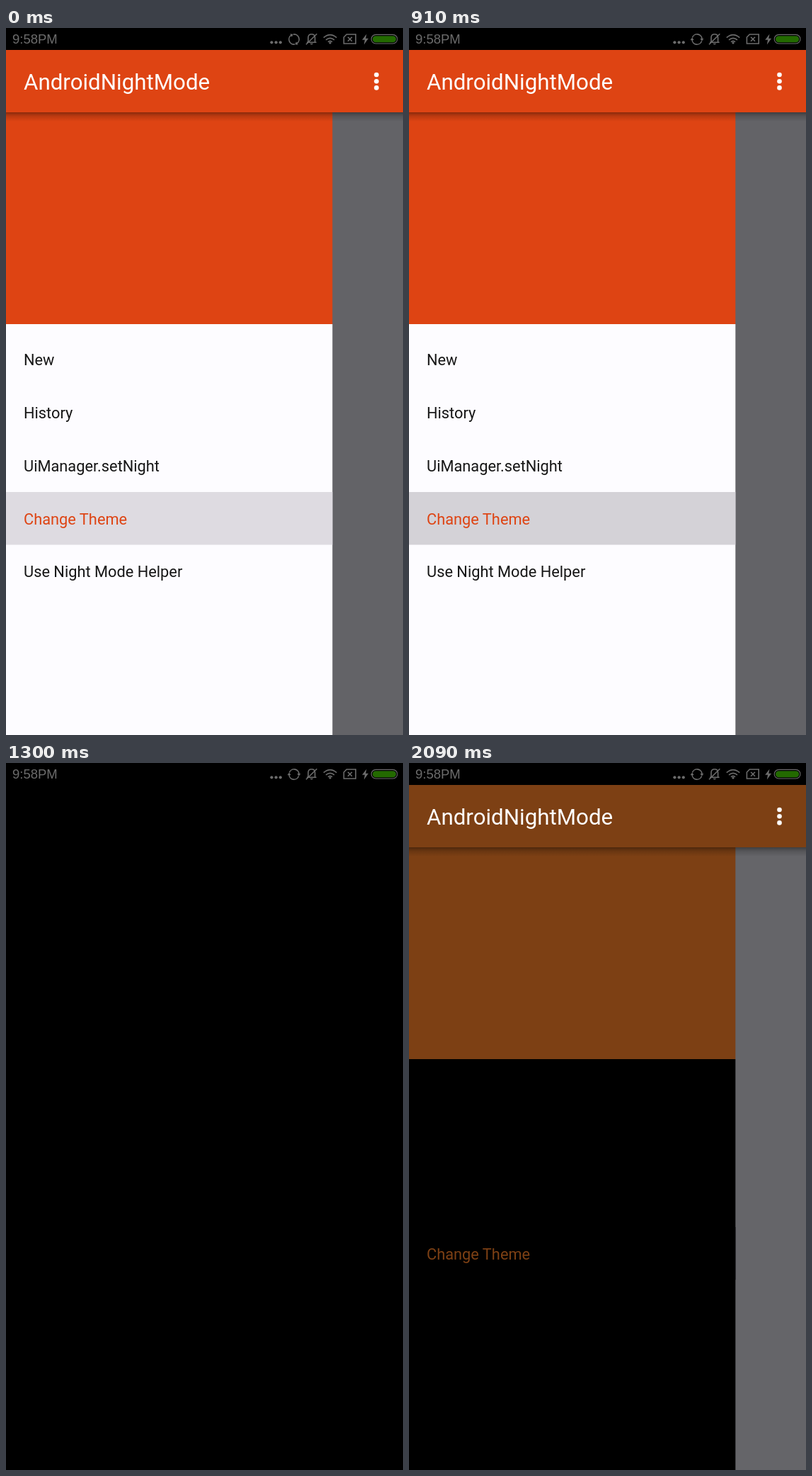
Write an HTML page that moves like this. It is 561 px wide and 998 px high and loops after 2220 ms.

```html
<!DOCTYPE html>
<html lang="en">
<head>
<meta charset="utf-8">
<title>Night mode</title>
<style>
  html, body { margin: 0; width: 100%; height: 100%; overflow: hidden; background: #000; }
  svg { display: block; width: 100vw; height: 100vh; }
  .day { --main: #de4413; --paper: #fdfcff; --ink: #161616; --dim: #636367; }
  .night { --main: #7d4014; --paper: #000; --ink: #000; --dim: #656569; }
  .main { fill: var(--main); }
  .paper { fill: var(--paper); }
  .dim { fill: var(--dim); }
  .title { font: 31.3px Roboto, sans-serif; fill: #fff; }
  .menu { font: 21.8px Roboto, sans-serif; fill: var(--ink); }
  .menu .on { fill: var(--main); }
  .clock { font: 18.5px "Liberation Sans", Arial, sans-serif; }
  .line { fill: none; stroke: #6c6c6c; stroke-width: 1.6; }
</style>
</head>
<body>
<svg viewBox="0 0 561 998" preserveAspectRatio="none">
  <defs>
    <linearGradient id="shade" x2="0" y2="1">
      <stop offset="0" stop-opacity=".38"/>
      <stop offset=".4" stop-opacity=".16"/>
      <stop offset="1" stop-opacity="0"/>
    </linearGradient>
  </defs>
  <rect width="561" height="998"/>

  <g id="app" class="day">
    <rect class="dim" y="119" width="561" height="879"/>
    <g id="drawer">
      <rect class="paper" y="418" width="461.3" height="580"/>
      <rect class="main" y="119" width="461.3" height="299"/>
      <rect id="row" y="655" width="461.3" height="74.5"/>
      <g id="menu" class="menu"></g>
    </g>
    <rect class="main" y="31" width="561" height="88"/>
    <rect y="119" width="561" height="13" fill="url(#shade)"/>
    <text class="title" x="25" y="87">AndroidNightMode</text>
    <g fill="#fff">
      <circle cx="523.5" cy="66" r="3.3"/>
      <circle cx="523.5" cy="75.2" r="3.3"/>
      <circle cx="523.5" cy="84.4" r="3.3"/>
    </g>
  </g>

  <g id="status" fill="#6c6c6c">
    <text class="clock" x="9" y="22.3">9:58PM</text>
    <circle cx="375.4" cy="20.3" r="2.1"/>
    <circle cx="381.6" cy="20.3" r="2.1"/>
    <circle cx="387.8" cy="20.3" r="2.1"/>
    <g id="sync">
      <path class="line" d="M400.4 13.5A7 7 0 0 1 414 15.5M413.6 18.5A7 7 0 0 1 400 16.5"/>
      <path d="M411.4 15h5l-2.5 3.4zM397.6 17h5l-2.5 -3.4z"/>
    </g>
    <path class="line" d="M425 20.3h13.6M427 20v-6.2q0-5 4.8-5t4.8 5V20M424 23.2L439.3 8.2"/>
    <path d="M429.3 21.8h5q-2.5 3.4-5 0z"/>
    <path class="line" stroke-width="2" d="M448.8 13.6q9.2-8 18.4 0M452 16.9q6-5.2 12 0M455 19.6q3-2.6 6 0"/>
    <circle cx="458" cy="21" r="1.6"/>
    <path class="line" d="M481.3 9h12.9v13h-16.8v-9zM483 12.8l6 6m0-6l-6 6"/>
    <path d="M509.5 8.5l-6.3 8.3h3.8l-1.2 6.6 6.3-8.6h-3.8z"/>
    <rect class="line" style="stroke-width:1.1" x="516.2" y="9.4" width="36.8" height="12.6" rx="6.3"/>
    <rect x="518" y="11.2" width="33.2" height="9" rx="4.5" fill="#236a00"/>
  </g>
</svg>
<script>
const $ = id => document.getElementById(id);
const LOOP = 2220;

const items = ["New", "History", "UiManager.setNight", "Change Theme", "Use Night Mode Helper"];
$("menu").innerHTML = items.map((label, i) =>
  `<text x="25" y="${476.2 + i * 74.8}"${i === 3 ? ' class="on"' : ""}>${label}</text>`).join("");

const steps = [
  { at: 0, theme: "day", x: 0, row: "#dedbe1", turn: 60 },
  { at: 910, theme: "day", x: 0, row: "#d4d2d7", turn: 0 },
  { at: 1040, theme: "day", x: 0, row: "#cac8ce", turn: 0 },
  { at: 1170, theme: "day", x: -147.3, row: "#dedbe1", turn: 0 },
  { at: 1300, theme: "", x: 0, row: "#000", turn: 0 },
  { at: 1440, theme: "night", x: 0, row: "#000", turn: 0 }
];

function draw(t) {
  const s = steps.findLast(step => step.at <= t);
  $("app").setAttribute("class", s.theme);
  $("app").style.display = s.theme ? "" : "none";
  $("drawer").setAttribute("transform", `translate(${s.x})`);
  $("row").setAttribute("fill", s.row);
  $("sync").setAttribute("transform", `rotate(${s.turn} 407 16)`);
}

function tick() {
  draw(performance.now() % LOOP);
  requestAnimationFrame(tick);
}
tick();
</script>
</body>
</html>
```
